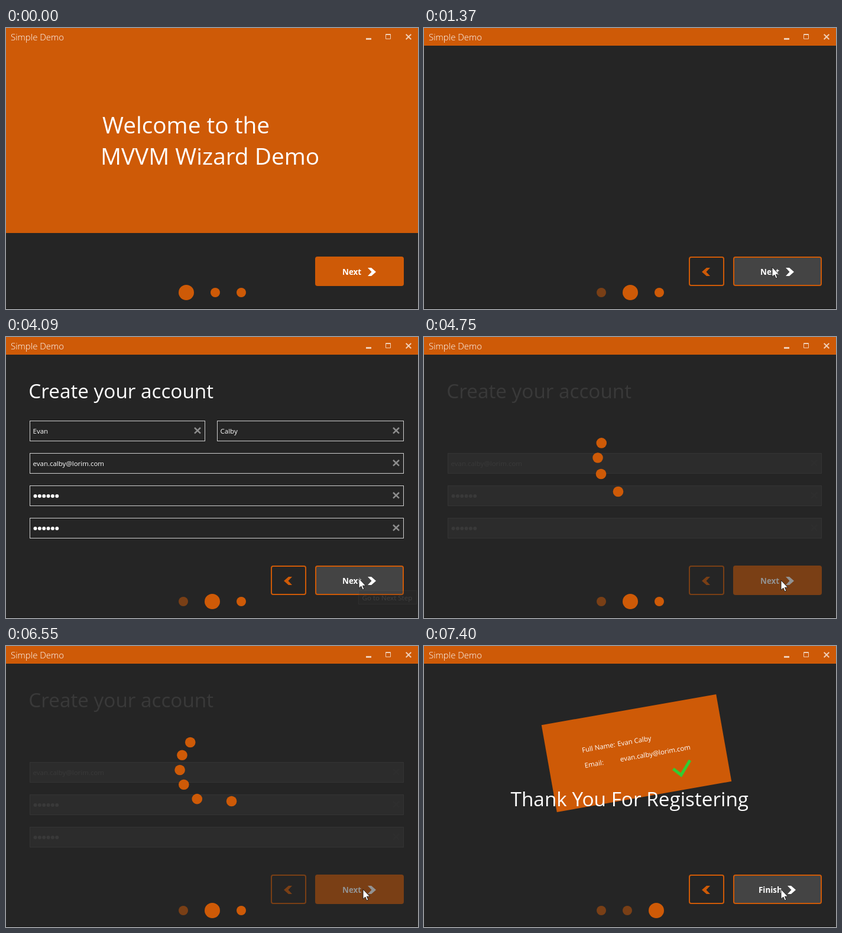
An HTML page for the animation above (8000 ms loop, 697 by 477 pixels).

```html
<!DOCTYPE html>
<html lang="en">
<head>
<meta charset="utf-8">
<title>Simple Demo</title>
<style>
  html, body { margin: 0; width: 100%; height: 100%; overflow: hidden; background: #252525; }
  svg { display: block; width: 100vw; height: 100vh; }
  text { font-family: "Open Sans", "Noto Sans", sans-serif; fill: #fff; white-space: pre; }
  .small { font-size: 11.5px; }
  .label { font-size: 13.4px; font-weight: 700; }
  .head { font-size: 33.3px; }
  .accent { fill: #ce5a07; }
  .line { fill: none; stroke: #ce5a07; stroke-width: 2; }
</style>
</head>
<body>
<svg id="stage" viewBox="0 0 697 477" xmlns="http://www.w3.org/2000/svg">
  <rect width="697" height="477" fill="#252525"/>
  <rect y="476" width="697" height="1" fill="#161616"/>
  <rect class="accent" width="697" height="30"/>

  <g id="welcome" font-size="38.8">
    <rect class="accent" y="30" width="697" height="318"/>
    <text x="163" y="179">Welcome to the</text>
    <text x="160" y="232">MVVM Wizard Demo</text>
  </g>

  <g id="account">
    <text class="head" x="38.3" y="103.5">Create your account</text>
  </g>

  <g id="thanks">
    <g transform="translate(359.5 182) rotate(-10)">
      <rect class="accent" x="-150" y="-75" width="300" height="150"/>
      <g class="small">
        <text x="-90" y="-17">Full Name:</text>
        <text x="-29" y="-17">Evan Calby</text>
        <text x="-90" y="9.5">Email:</text>
        <text x="-29" y="9.5">evan.calby@lorim.com</text>
      </g>
    </g>
    <path d="M421.5 208.5L435 219L450 194" fill="none" stroke="#32cd32" stroke-width="5"/>
    <text class="head" x="146.5" y="272">Thank You For Registering</text>
  </g>

  <text x="8" y="21" font-size="15" font-weight="300">Simple Demo</text>
  <g stroke="#fff" fill="none" opacity=".7">
    <path d="M609 18.5h9" stroke-width="3"/>
    <path d="M642.5 10.5h8v8h-8zM642 11.5h9" stroke-width="1"/>
    <path d="M676.7 10.7l8.6 8.6M685.3 10.7l-8.6 8.6" stroke-width="2"/>
  </g>

  <g id="steps" class="accent"></g>
  <g id="back">
    <rect class="line" x="449" y="389" width="58" height="48" rx="3"/>
    <path class="accent" d="M484 407h-6l-8 7l8 7h6l-6.5-7z"/>
  </g>
  <g id="next">
    <rect class="accent" x="523" y="388" width="150" height="50" rx="4"/>
    <rect id="hover" x="525" y="390" width="146" height="46" rx="2" fill="#444"/>
    <text id="caption" class="label" y="419"></text>
    <path id="arrow" fill="#fff" d="M612 407h6l8 7l-8 7h-6l6.5-7z"/>
  </g>

  <g id="ring" class="accent"></g>

  <g id="tip">
    <rect x=".5" y=".5" width="98" height="23" fill="#333" stroke="#5a5a5a"/>
    <text x="6.5" y="17" font-size="11.6" style="fill:#b8b8b8">Go to Next Step</text>
  </g>
  <path id="cursor" d="M0 0V16.5L3.8 13L6.3 18.9L8.8 17.8L6.4 12.2H11.6Z" fill="#fff" stroke="#111" stroke-width=".9"/>
</svg>
<script>
const LOOP = 8000;
const $ = id => document.getElementById(id);

// The screen is repainted only at these moments.
const repaints = [0, 680, 800, 960, 1100, 1250, 1370, 1500, 1650, 1770, 1890, 2040, 2160,
  3430, 3550, 3710, 3850, 3970, 4090, 4210, 4370, 4490, 4630, 4750, 4910, 5050, 5200, 5350,
  5510, 5630, 5770, 5890, 6010, 6130, 6250, 6400, 6550, 6710, 6860, 6980, 7140, 7280, 7400];

// Pointer path: time, x, y.
const pointer = [[680, 655, 391], [800, 629, 397], [960, 594, 405], [1100, 589, 406],
  [1770, 592, 406], [1890, 632, 400], [2040, 680, 389], [2160, 688, 386],
  [3430, 668, 392], [3550, 653, 397], [3710, 613, 407], [3850, 600, 409],
  [3970, 597, 410], [4750, 604, 413]];

// Spinner angles: seconds, degrees, optional spline into this key.
const spin = [[0, -110], [.433, 10, [.02, .33, .38, .77]], [1.2, 93],
  [1.617, 205, [.57, .17, .95, .75]], [2.017, 357, [0, .19, .07, .72]],
  [2.783, 439], [3.217, 585, [0, 0, .95, .37]]];

function add(parent, tag, attrs, text) {
  const el = document.createElementNS("http://www.w3.org/2000/svg", tag);
  for (const key in attrs) el.setAttribute(key, attrs[key]);
  if (text) el.textContent = text;
  return parent.appendChild(el);
}
const set = (el, key, value) => el.setAttribute(key, value);
const show = (id, on) => { $(id).style.display = on ? "" : "none"; };
const clamp = v => Math.max(0, Math.min(1, v));
const lastBefore = (list, t, key = v => v) => list.filter(v => key(v) <= t).pop();

function addField(parent, x, y, width, text) {
  add(parent, "rect", { x: x + .5, y: y + .5, width: width - 1, height: 34,
    stroke: "#cfcfcf", fill: "#fff", "fill-opacity": 0, class: "field" });
  if (text) add(parent, "text", { x: x + 5.5, y: y + 22, class: "small" }, text);
  else for (let i = 0; i < 6; i++)
    add(parent, "circle", { cx: x + 9.5 + 7.35 * i, cy: y + 18, r: 3, fill: "#fff" });
  add(parent, "path", { d: `M${x + width - 18} ${y + 12}l10 9.6m0 -9.6l-10 9.6`,
    stroke: "#8d8d8d", "stroke-width": 2.5 });
}

const names = add($("account"), "g", {});
addField(names, 40, 142, 297, "Evan");
addField(names, 357, 142, 316, "Calby");
addField($("account"), 40, 197, 633, "evan.calby@lorim.com");
addField($("account"), 40, 252, 633);
addField($("account"), 40, 307, 633);
const fields = document.querySelectorAll(".field");

const steps = [0, 1, 2].map(() => add($("steps"), "circle", { cy: 449 }));
const dots = Array.from({ length: 6 }, () => add($("ring"), "circle", { r: 8.8 }));

function spline([x1, y1, x2, y2], u) {
  const curve = (a, b, s) => 3 * (1 - s) ** 2 * s * a + 3 * (1 - s) * s * s * b + s ** 3;
  let lo = 0, hi = 1;
  for (let i = 0; i < 24; i++) {
    const mid = (lo + hi) / 2;
    if (curve(x1, x2, mid) < u) lo = mid; else hi = mid;
  }
  return curve(y1, y2, lo);
}

function spinAngle(s) {
  const i = spin.findIndex(key => key[0] > s);
  const [t0, a0] = spin[i - 1], [t1, a1, ease] = spin[i];
  const u = (s - t0) / (t1 - t0);
  return a0 + (a1 - a0) * (ease ? spline(ease, u) : u);
}

function drawRing(t) {
  const seconds = (1.045 * t - 4319) / 1000;
  dots.forEach((dot, i) => {
    const s = seconds - .167 * i;
    const on = s >= 0 && s < 3.217;
    dot.style.display = on ? "" : "none";
    if (!on) return;
    const a = (spinAngle(s) - 6 * i - 97) * Math.PI / 180;
    set(dot, "cx", 356 + 62 * Math.sin(a));
    set(dot, "cy", 207 - 62 * Math.cos(a));
  });
}

function drawSteps(page) {
  let x = 292;
  steps.forEach((dot, i) => {
    const r = i === page ? 13 : 8;
    set(dot, "cx", x + r);
    set(dot, "r", r);
    set(dot, "opacity", i < page ? .5 : 1);
    x += 2 * r + 28;
  });
}

function slideIn(id, t, start, alpha = 1) {
  const p = clamp((t - start) / 520);
  set($(id), "transform", `translate(${697 * (1 - p) ** 2} 0)`);
  set($(id), "opacity", p * alpha);
}

function hoverAmount(t) {
  if (t < 680) return 0;
  if (t < 800) return .5;
  if (t < 2040) return 1;
  if (t < 2160) return .5;
  if (t < 3430) return 0;
  return t < 3550 ? .5 : 1;
}

function render(now) {
  const t = lastBefore(repaints, now % LOOP);
  const page = t < 1370 ? 0 : t < 7140 ? 1 : 2;
  const busy = t >= 4210 && t < 7140;

  show("welcome", page === 0);
  show("account", page === 1);
  show("thanks", page === 2);
  show("back", page > 0);
  show("ring", busy);
  slideIn("account", t, 1370, busy ? .09 : 1);
  slideIn("thanks", t, 6880);
  names.style.display = busy ? "none" : "";
  fields.forEach(f => set(f, "fill-opacity", busy ? .35 : 0));

  set($("back"), "opacity", busy ? .5 : 1);
  set($("next"), "opacity", busy ? .5 : 1);
  set($("hover"), "opacity", busy ? 0 : hoverAmount(t));
  $("caption").textContent = page === 2 ? "Finish" : "Next";
  set($("caption"), "x", page === 2 ? 566 : 569);
  set($("arrow"), "transform", `translate(${page === 2 ? 3 : 0} 0)`);

  drawSteps(page);
  if (busy) drawRing(t);

  const firstTip = t >= 1250 && t < 1370, secondTip = t >= 4090 && t < 4210;
  show("tip", firstTip || secondTip);
  set($("tip"), "transform", firstTip ? "translate(589 425)" : "translate(596 430)");
  set($("tip"), "opacity", firstTip ? 1 : .18);

  const at = lastBefore(pointer, t, key => key[0]);
  show("cursor", at);
  if (at) set($("cursor"), "transform", `translate(${at[1]} ${at[2]})`);
}

const began = performance.now();
function tick() {
  render(performance.now() - began);
  requestAnimationFrame(tick);
}
tick();
</script>
</body>
</html>
```
